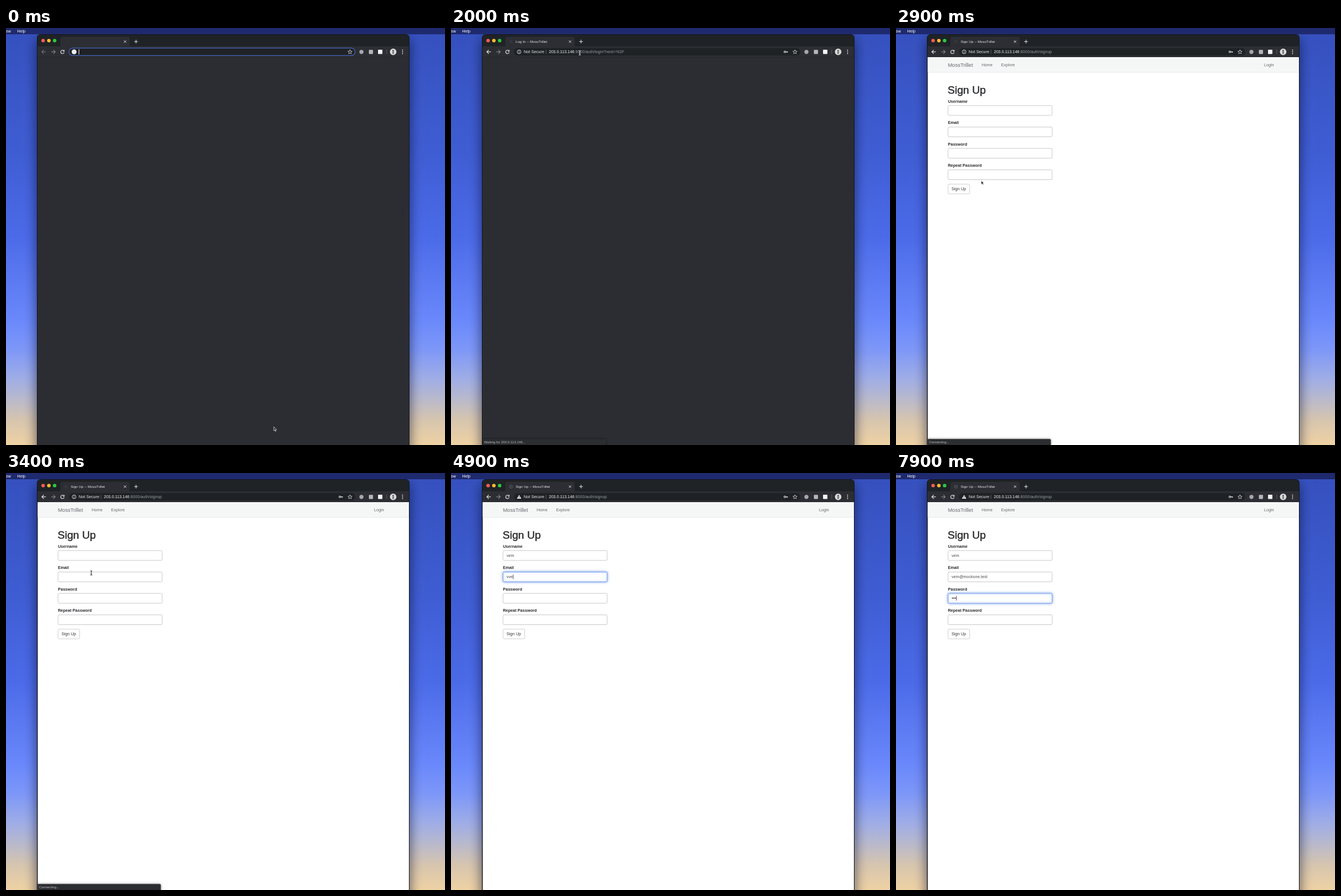
These frames come from a looping animation (767x730 px, 8000 ms). An HTML page with a canvas:

```html
<!DOCTYPE html>
<html lang="en">
<head>
<meta charset="utf-8">
<title>Sign up walkthrough</title>
<style>
html, body { margin: 0; width: 100%; height: 100%; overflow: hidden; background: #3550c0; }
canvas { display: block; width: 767px; height: 730px; }
</style>
</head>
<body>
<canvas id="stage" width="767" height="730"></canvas>
<script>
const ctx = document.getElementById('stage').getContext('2d');
const LOOP = 8000, STEP = 100;
const FONT = '"Liberation Sans", Arial, sans-serif';
const SITE = 'MossTrillet', HOST = '203.0.113.146', PORT = ':8000';
const USER = 'vem', DOMAIN = 'mockone.test';

// Times of the page changes, in ms
const T = { paste: 1200, enter: 1500, title: 1900, login: 2100, click: 2800, signup: 2900,
  idle: 3700, user: 3800, warn: 4100, email: 4600, domain: 6500, pass: 7500 };

const userKeys = [[0, ''], [4100, 'v'], [4200, 've'], [4400, USER]];
const emailKeys = [[0, ''], [4700, 'v'], [4800, 'vv'], [4900, 'vve'], [5100, 'vvem'],
  [5300, 'vve'], [5400, 'v'], [5500, ''], [5800, 'v'], [5900, 've'], [6100, USER], [6300, USER + '@']];
const passKeys = [[0, 0], [7600, 1], [7800, 2], [7900, 3]];
const pointerPath = [[300, 469, 702], [1100, 225, 43.5], [2200, 225, 43.5], [2700, 150, 271],
  [3000, 150, 271], [3400, 149, 175], [3700, 149, 146]];

const at = (keys, t) => keys.filter(k => k[0] <= t).pop()[1];

function rect(x, y, w, h, fill, r = 0, stroke, lw = 1) {
  ctx.beginPath();
  ctx.roundRect(x, y, w, h, r);
  if (fill) { ctx.fillStyle = fill; ctx.fill(); }
  if (stroke) { ctx.strokeStyle = stroke; ctx.lineWidth = lw; ctx.stroke(); }
}

function disc(x, y, r, fill, stroke, lw = 1) {
  ctx.beginPath();
  ctx.arc(x, y, r, 0, Math.PI * 2);
  if (fill) { ctx.fillStyle = fill; ctx.fill(); }
  if (stroke) { ctx.strokeStyle = stroke; ctx.lineWidth = lw; ctx.stroke(); }
}

function line(points, color, lw = 1, fill) {
  ctx.beginPath();
  points.forEach(([x, y], i) => i ? ctx.lineTo(x, y) : ctx.moveTo(x, y));
  if (fill) { ctx.closePath(); ctx.fillStyle = fill; ctx.fill(); }
  if (color) { ctx.strokeStyle = color; ctx.lineWidth = lw; ctx.stroke(); }
}

function text(s, x, y, color, size = 7.1, weight = '') {
  ctx.font = `${weight} ${size}px ${FONT}`;
  ctx.fillStyle = color;
  ctx.fillText(s, x, y);
  return x + ctx.measureText(s).width;
}

function desktop() {
  const sky = ctx.createLinearGradient(0, 0, 0, 730);
  [[0, '#3550bd'], [.3, '#3f5dd3'], [.5, '#4b6ae8'], [.7, '#6a88fb'], [.77, '#7d97f8'],
    [.84, '#9fade6'], [.89, '#b9b9cc'], [.94, '#d6c5ae'], [1, '#efd2a4']]
    .forEach(([p, c]) => sky.addColorStop(p, c));
  ctx.fillStyle = sky;
  ctx.fillRect(0, 0, 767, 730);
  ctx.save();
  ctx.shadowColor = 'rgba(5,10,45,.65)';
  ctx.shadowBlur = 22;
  ctx.shadowOffsetY = 9;
  rect(54, 11, 651, 760, '#15171b', 6);
  ctx.restore();
  rect(0, 0, 767, 11, '#1f2a6e');
  text('ow', -.5, 7.6, '#fff', 7);
  text('Help', 19.5, 7.6, '#fff', 7);
}

function arrowIcon(x, dir, color) {
  line([[x - 3.4 * dir, 41.7], [x + 3.6 * dir, 41.7]], color, 1.1);
  line([[x, 38.3], [x - 3.4 * dir, 41.7], [x, 45.1]], color, 1.1);
}

function star(x, y) {
  const pts = [];
  for (let i = 0; i <= 10; i++) {
    const a = i * Math.PI / 5 - Math.PI / 2, r = i % 2 ? 1.7 : 3.9;
    pts.push([x + r * Math.cos(a), y + r * Math.sin(a)]);
  }
  line(pts, '#d5d7da', .8);
}

function siteBadge(t) {
  if (t < T.warn) {
    disc(119, 41.7, 3.3, null, '#e8eaed', .9);
    rect(118.55, 41.2, .9, 2.4, '#e8eaed');
    rect(118.55, 39.6, .9, 1, '#e8eaed');
  } else {
    line([[119, 38.2], [122.9, 45], [115.1, 45]], null, 0, '#e8eaed');
    rect(118.6, 40.5, .8, 2.2, '#202326');
    rect(118.6, 43.2, .8, .8, '#202326');
  }
}

function addressBar(t) {
  const open = t >= T.enter;
  rect(110, 35.2, 500, 13, '#1f2225', 6.5, open ? null : '#4664bd', 1.2);
  if (!open) {
    disc(119, 41.7, 4.3, '#eceef0');
    const end = t >= T.paste ? text(HOST + PORT, 127, 44.3, '#e8eaed') : 127;
    if (t % 1000 < 500) rect(end, 37.3, 1, 9, '#e8eaed');
  } else {
    siteBadge(t);
    text('Not Secure', 127, 44.3, '#e8eaed', 7.2);
    rect(165.6, 38, .8, 7.5, '#666a6e');
    const end = text(HOST, 171, 44.3, '#f3f4f5', 7.05);
    const path = t >= T.signup ? '/auth/signup' : t >= T.title ? '/auth/login?next=%2F' : '';
    text(PORT + path, end, 44.3, '#95999d', 7.15);
    if (t >= T.title) {
      disc(583.3, 41.7, 1.5, null, '#e0e2e5', 1.1);
      rect(584.6, 41.1, 4, 1.2, '#e0e2e5');
      rect(586.8, 42, 1.2, 1.3, '#e0e2e5');
    }
  }
  star(601, 42);
}

function browser(t) {
  rect(55, 12, 649, 740, '#2c2d32', 5);
  rect(55, 12, 649, 21, '#1f2326', [5, 5, 0, 0]);
  rect(95, 15.5, 121, 18, '#2c2e33', [4, 4, 0, 0]);
  rect(55, 32, 649, 19, '#2c2e33');
  rect(55, 50.5, 649, 1, '#25272b');
  ['#fc5b57', '#fdbc2e', '#2bc840'].forEach((c, i) => disc(64.8 + i * 10.1, 22, 3.1, c));

  const loading = t >= T.enter && t < T.login || t >= T.click && t < T.idle;
  if (t >= T.enter) {
    disc(104.7, 23.9, 2.8, '#33363a', loading ? null : '#555a5e', .9);
    if (!loading) line([[102.9, 22], [106.5, 25.8]], '#555a5e', .8);
    const page = t >= T.signup ? 'Sign Up' : 'Log In';
    text(t < T.title ? HOST + PORT : `${page} -- ${SITE}`, 113, 26.1, '#e3e5e8', 6.25);
  }
  line([[206, 21.8], [210, 25.8]], '#e3e5e8', .9);
  line([[210, 21.8], [206, 25.8]], '#e3e5e8', .9);
  line([[224, 23.8], [230.4, 23.8]], '#e3e5e8', 1);
  line([[227.2, 20.6], [227.2, 27]], '#e3e5e8', 1);

  arrowIcon(66, 1, t >= T.enter ? '#eceef0' : '#73767a');
  arrowIcon(82.7, -1, '#85888c');
  ctx.beginPath();
  ctx.arc(98.7, 41.8, 3, .25, 5.3);
  ctx.strokeStyle = '#eceef0';
  ctx.lineWidth = 1.1;
  ctx.stroke();
  line([[102.2, 38], [102.2, 41.3], [98.9, 41.3]], null, 0, '#eceef0');

  addressBar(t);
  disc(621, 41.8, 3.6, '#a5a8ac');
  rect(634, 38.2, 7.2, 7.2, '#b5b7ba', 1);
  rect(650, 38, 7.6, 7.6, '#f2f3f4', .8);
  rect(664.7, 37.6, .8, 8, '#63666a');
  disc(676.4, 41.7, 5.7, '#d9dad9');
  disc(676.4, 39.7, 1.5, '#55565a');
  rect(674.9, 41.2, 3, 4.4, '#77787b', 1.4);
  [38.7, 41.7, 44.7].forEach(y => disc(692.8, y, .9, '#e3e5e8'));
}

function field(y, focused) {
  if (focused) {
    ctx.save();
    ctx.shadowColor = 'rgba(82,135,235,.75)';
    ctx.shadowBlur = 4;
    rect(90.9, y, 182, 17.2, '#fff', 2, '#7a9fe6', 1);
    ctx.restore();
  } else {
    rect(90.9, y, 182, 17.2, '#fff', 2, '#c3c5c7', .9);
  }
}

const label = (s, y) => text(s, 90.7, y, '#292a2c', 7.1, 'bold');

function button(s, y, w) {
  rect(90.9, y, w, 17, '#fff', 2, '#c9cbcd', .9);
  text(s, 97, y + 11, '#333');
}

function heading(s, y) {
  text(s, 90.3, y, '#2b2c2f', 18.7);
  ctx.strokeStyle = '#2b2c2f';
  ctx.lineWidth = .45;
  ctx.strokeText(s, 90.3, y);
}

function caret(x, y, t, on) {
  if (on || t % 1000 < 500) rect(x + .3, y - 4, .8, 8, '#333');
}

function pageFrame() {
  rect(55.5, 51, 648.5, 679, '#fff');
  rect(55.5, 51, 648.5, 26, '#f5f7f7');
  rect(55.5, 77, 648.5, .8, '#dfe3e4');
  text(SITE, 90.7, 67.7, '#66686b', 9.15);
  text('Home', 149.7, 67, '#66686b');
  text('Explore', 183.7, 67, '#66686b');
  text('Login', 643, 67, '#66686b');
}

function loginPage() {
  rect(90.5, 87.5, 578, 26.8, '#d8eaf3', 2);
  text('Please log in to access this page.', 98.7, 103.4, '#3a5389');
  heading('Log In', 141.3);
  label('Username', 156.8);
  field(161.9);
  label('Password', 194.3);
  field(199.4);
  rect(91.2, 226.6, 5.6, 5.6, '#fff', 1, '#a4a6a8', .9);
  text('Remember Me', 100.7, 231.9, '#2f3032');
  button('Log In', 239.5, 32.8);
  const x = text('New User? ', 90.7, 274.5, '#2f3032');
  text('Click to Sign Up!', x, 274.5, '#3357ad');
}

function signupPage(t) {
  heading('Sign Up', 115);
  const focus = t >= T.pass ? 2 : t >= T.email ? 1 : t >= T.user ? 0 : -1;
  ['Username', 'Email', 'Password', 'Repeat Password'].forEach((s, i) => {
    label(s, 130.5 + i * 37.5);
    field(135.8 + i * 37.5, i === focus);
  });
  button('Sign Up', 273.3, 37.8);

  const tail = t >= T.domain ? DOMAIN.slice(0, Math.floor((t - T.domain) / 75)) : '';
  const ends = [
    text(at(userKeys, t), 97, 146.6, '#4b4d50'),
    text(at(emailKeys, t) + tail, 97, 184.1, '#4b4d50'),
    97
  ];
  const dots = at(passKeys, t);
  for (let i = 0; i < dots; i++) disc(98.6 + i * 2.6, 219, 1.05, '#2f3032');
  if (dots) ends[2] = 97 + dots * 2.6;
  if (focus >= 0) caret(ends[focus], 144.3 + focus * 37.5, t, t > 4600 && t < 5500 || t > 5700);
}

function statusBar(t) {
  const s = t >= T.enter && t < 2500 ? `Waiting for ${HOST}...`
    : t >= T.click && t < T.idle ? 'Connecting...' : '';
  if (!s) return;
  ctx.save();
  ctx.shadowColor = 'rgba(0,0,0,.45)';
  ctx.shadowBlur = 4;
  rect(55.5, 719.5, 215, 12, '#2b2d31', [0, 2, 0, 0]);
  ctx.restore();
  text(s, 57.7, 727, '#b9bcc0', 5.95);
}

function pointer(t) {
  if (t >= T.warn) return;
  const next = pointerPath.findIndex(p => p[0] > t);
  let [, x, y] = pointerPath[next < 0 ? pointerPath.length - 1 : Math.max(next - 1, 0)];
  if (next > 0) {
    const [t0, x0, y0] = pointerPath[next - 1], [t1, x1, y1] = pointerPath[next];
    const p = (t - t0) / (t1 - t0), e = p * p * (3 - 2 * p);
    x = x0 + (x1 - x0) * e;
    y = y0 + (y1 - y0) * e;
  }
  const inBar = y < 49, inForm = t >= 3400;
  if (inBar || inForm) {
    const c = inBar ? '#dfe1e4' : '#2c2d30';
    line([[x, y - 3.5], [x, y + 3.5]], c, 1);
    [-1, 1].forEach(d => line([[x - 1.8, y + 4 * d], [x, y + 3.3 * d], [x + 1.8, y + 4 * d]], c, .9));
    line([[x - 1.2, y + 1.4], [x + 1.2, y + 1.4]], c, .7);
  } else {
    const shape = [[0, 0], [0, 6.6], [1.5, 5.2], [2.6, 7.8], [3.7, 7.3], [2.7, 4.8], [4.6, 4.7]];
    line([...shape, [0, 0]].map(([a, b]) => [x - 1 + a, y - 3.7 + b]), '#f0f0f0', .8, '#111');
  }
}

function draw(t) {
  desktop();
  browser(t);
  if (t >= T.login) {
    pageFrame();
    t >= T.signup ? signupPage(t) : loginPage();
  }
  statusBar(t);
  pointer(t);
}

const start = performance.now();
function tick() {
  const t = (performance.now() - start) % LOOP;
  draw(Math.floor(t / STEP) * STEP);
  requestAnimationFrame(tick);
}
tick();
</script>
</body>
</html>
```
